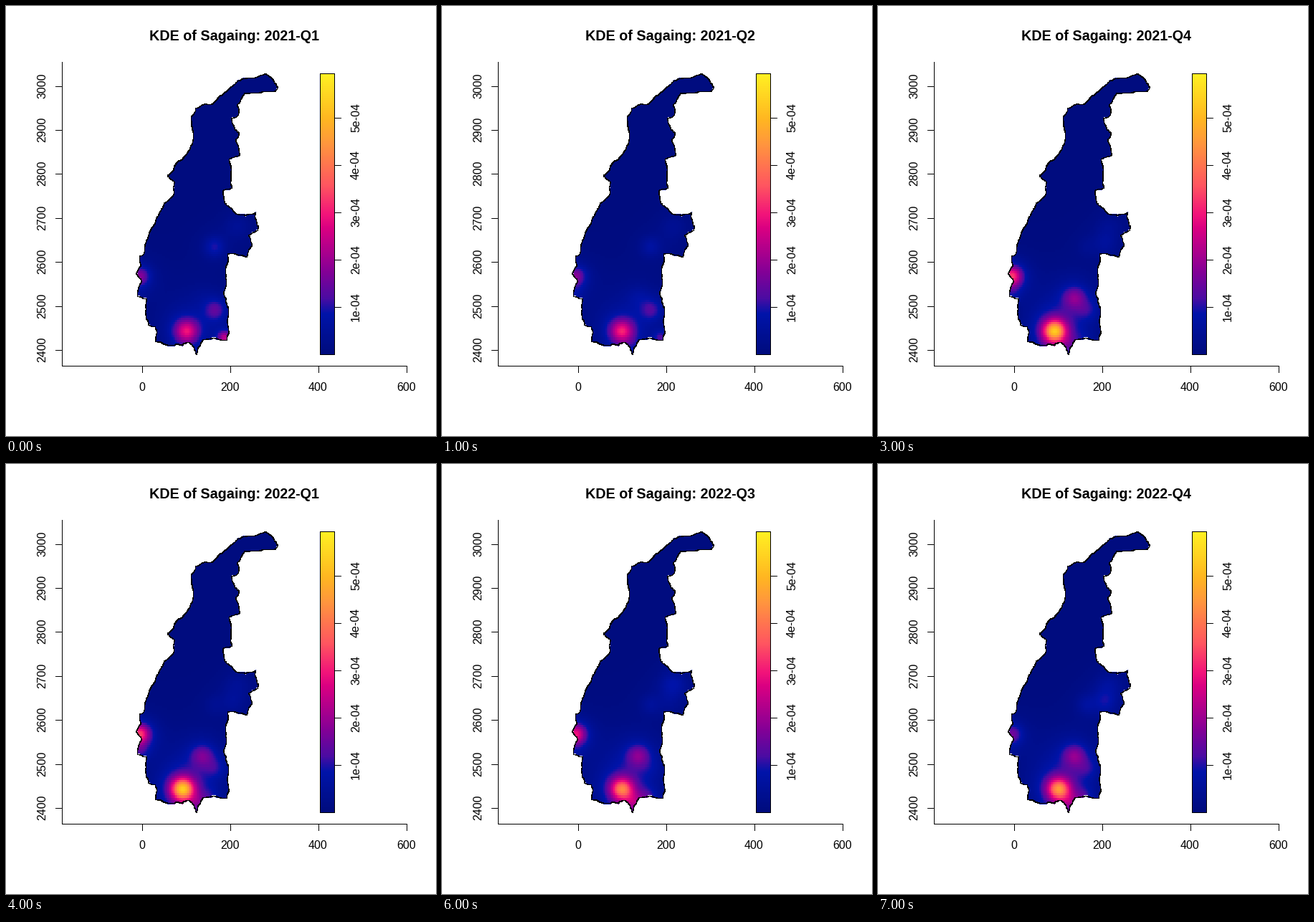
These frames come from a looping animation (600 by 600 pixels, 8 s). A matplotlib script:

```python
import numpy as np
import matplotlib.pyplot as plt
from matplotlib.animation import FuncAnimation
from matplotlib.colors import LinearSegmentedColormap
from matplotlib.path import Path

plt.rcParams["font.family"] = ["Liberation Sans", "DejaVu Sans"]

SIZE, DPI = 600, 72
QUARTERS = 8
TOP_VALUE = 5.95          # upper end of the colour ribbon, in 1e-04
LEFT, RIGHT, TOP, BOTTOM = 182, 380, 94, 487
CELLS = 128

# Key points of the region border, clockwise
CORNERS = [(313, 113), (322, 105), (345, 100), (362, 94), (379, 113), (376, 118),
           (333, 121), (322, 138), (324, 152), (314, 156), (325, 178), (320, 186),
           (326, 208), (311, 213), (315, 254), (302, 257), (305, 275), (321, 290),
           (348, 288), (351, 313), (338, 320), (343, 334), (335, 350), (309, 346),
           (307, 385), (303, 400), (308, 440), (308, 466), (275, 465), (265, 486),
           (255, 469), (208, 468), (208, 447), (199, 445), (196, 408), (183, 405),
           (189, 384), (181, 374), (188, 362), (186, 349), (192, 346), (198, 322),
           (209, 296), (222, 274), (234, 262), (235, 246), (225, 236), (252, 206),
           (261, 184), (258, 154), (265, 142), (285, 137)]

# Blue-magenta-yellow ramp
RAMP = LinearSegmentedColormap.from_list("bmy", [
    (0.00, "#000c7d"), (0.145, "#0014aa"), (0.20, "#4b0ca3"), (0.30, "#870096"),
    (0.45, "#da0082"), (0.50, "#f2147a"), (0.60, "#ff5461"), (0.75, "#ff963e"),
    (0.84, "#ffb721"), (1.00, "#fff123")])

# Hot spots: place, spread, and strength at the key quarters
KEYS = [0, 2, 3, 5, 6, 7]
SPOTS = [
    ((249, 454, 11), (2.75, 3.0, 5.0, 5.1, 3.8, 4.1)),
    ((187, 377, 9), (1.65, 1.65, 3.2, 3.2, 2.8, 1.45)),
    ((187, 399, 8), (0.2, 0.75, 0.5, 1.1, 0.3, 0.1)),
    ((274, 407, 11), (0.1, 0.6, 1.5, 1.15, 1.5, 1.5)),
    ((292, 424, 10), (1.2, 0.8, 0.65, 0.6, 0.25, 0.6)),
    ((268, 473, 9), (0, 0.55, 0.6, 1.1, 1.3, 1.0)),
    ((287, 465, 9), (0, 0, 0.3, 0.6, 0.7, 0.7)),
    ((305, 463, 6), (2.2, 0, 0, 0, 0, 0)),
    ((323, 307, 12), (0.4, 0.3, 0.3, 0.4, 0.75, 0.45)),
    ((317, 331, 11), (0, 0.15, 0.45, 0.3, 0.25, 0.75)),
    ((291, 336, 9), (0.9, 0.3, 0.2, 0.3, 0.4, 0.45)),
    ((250, 425, 38), (0.2, 0.25, 0.3, 0.3, 0.35, 0.35)),
]


def roughen(points, levels=4, amount=0.11):
    """Halve every edge again and again, shifting each midpoint a little."""
    rng = np.random.default_rng(4)
    pts = np.array(points, float)
    for _ in range(levels):
        edge = np.roll(pts, -1, axis=0) - pts
        length = np.hypot(*edge.T)[:, None]
        mid = pts + edge / 2 + rng.uniform(-amount, amount, pts.shape) * length
        pts = np.stack([pts, mid], axis=1).reshape(-1, 2)
    return np.round(np.vstack([pts, pts[:1]])) + 0.5


border = roughen(CORNERS)
xs = LEFT + (np.arange(CELLS) + 0.5) * (RIGHT - LEFT) / CELLS
ys = TOP + (np.arange(CELLS) + 0.5) * (BOTTOM - TOP) / CELLS
gx, gy = np.meshgrid(xs, ys)
inside = Path(border).contains_points(np.c_[gx.ravel(), gy.ravel()])
inside = inside.reshape(gx.shape)


def density(t):
    """Sum of hot spots, each a narrow core with a halo twice as wide."""
    total = np.full(gx.shape, 0.05)
    drift = 3 * np.cos(2 * np.pi * t / (QUARTERS - 1))
    for k, ((x, y, s), strengths) in enumerate(SPOTS):
        shift = drift if k == 0 else 0
        d = ((gx - x - shift) ** 2 + (gy - y) ** 2) / (2 * s * s)
        total += np.interp(t, KEYS, strengths) * (
            0.75 * np.exp(-d) + 0.25 * np.exp(-d / 4))
    return np.ma.masked_where(~inside, total)


fig = plt.figure(figsize=(SIZE / DPI, SIZE / DPI), dpi=DPI, facecolor="white")
ax = fig.add_axes([0, 0, 1, 1])
ax.axis("off")


def line(x, y):
    ax.plot(x, y, color="black", lw=1, antialiased=False,
            solid_capstyle="projecting", solid_joinstyle="miter")


def label(x, y, text, size=16, **kw):
    return ax.text(x, y, text, fontsize=size, ha="center", va="baseline",
                   rotation_mode="anchor", color="black", **kw)


heat = ax.imshow(density(0), cmap=RAMP, vmin=0, vmax=TOP_VALUE,
                 extent=(LEFT, RIGHT, BOTTOM, TOP), interpolation="nearest",
                 aspect="auto")
ax.plot(*border.T, color="black", lw=1, antialiased=False, snap=False)

# Colour ribbon
ax.imshow(np.linspace(1, 0, 256)[:, None], cmap=RAMP, vmin=0, vmax=1,
          extent=(438, 459, 487, 94), interpolation="nearest", aspect="auto")
line([438, 458, 458, 438, 438], [94, 94, 486, 486, 94])
for k in range(1, 6):
    y = 486 - 66 * k
    line([458, 467], [y, y])
    label(493, y - 0.5, f"{k}e-04", rotation=90)

# Axes
line([78, 78, 559], [78, 502, 502])
for k in range(4):
    x = 190 + 123 * k
    line([x, x], [502, 511])
    label(x - 0.5, 537, str(200 * k))
for k in range(7):
    y = round(480 - 61.4 * k)
    line([69, 78], [y, y])
    label(55, y - 0.5, str(2400 + 100 * k), rotation=90)

title = label(318, 48, "", size=19.8, weight="bold")
ax.set_xlim(0, SIZE)
ax.set_ylim(SIZE, 0)


def draw(i):
    heat.set_data(density(i))
    title.set_text(f"KDE of Sagaing: {2021 + i // 4}-Q{i % 4 + 1}")
    return heat, title


anim = FuncAnimation(fig, draw, frames=QUARTERS, interval=1000, repeat=True)
plt.show()
```
